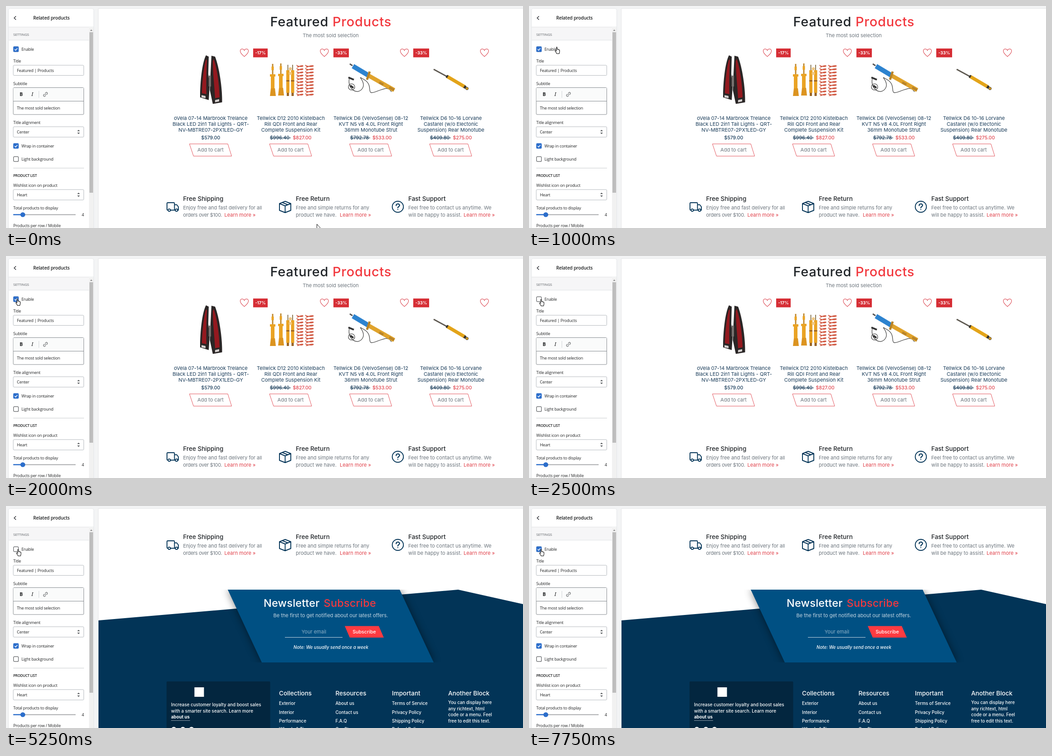
An HTML page for the animation above (8 s loop, 1140 by 491 pixels).

```html
<!DOCTYPE html>
<html lang="en">
<head>
<meta charset="utf-8">
<title>Related products settings</title>
<style>
html, body { margin: 0; width: 100%; height: 100%; overflow: hidden; background: #f3f4f5; }
svg { display: block; width: 1140px; height: 491px; }
text { white-space: pre; }
.side { font: 9.1px "Open Sans", "Noto Sans", sans-serif; letter-spacing: -.2px; fill: #202223; }
.side .caps { font-size: 8px; }
.semi { font-weight: 600; }
.field { fill: #fff; stroke: #b4b9be; }
.icon { fill: none; stroke: #5c5f62; }
.page { font: 11px Inter, "Open Sans", sans-serif; fill: #6c757d; }
.page .big { font-size: 29px; font-weight: 500; letter-spacing: .75px; }
.page .mid { font-size: 23.5px; font-weight: 500; letter-spacing: .2px; }
.page .head { font-size: 13.5px; font-weight: 500; fill: #212529; }
.page .price { font-size: 10.5px; font-weight: 500; }
.page .badge { font-size: 9.3px; font-weight: 700; fill: #fff; }
.page .small { font-size: 9.7px; font-weight: 500; fill: #fff; }
.c { text-anchor: middle; }
.old { text-decoration: line-through; }
.page .ink { fill: #212529; }
.page .navy { fill: #173a58; }
.page .red { fill: #e0414a; }
.page .hot { fill: #f2393f; }
.page .white { fill: #fff; }
.line { fill: none; stroke: #023457; stroke-width: 1.9; stroke-linejoin: round; stroke-linecap: round; }

#tick, #shop, #rest, #arrow, #beam, #hand { animation: 8s step-end infinite; }
#tick { animation-name: tick; }
#shop { animation-name: shop; }
#rest { animation-name: rest; }
#arrow { animation-name: arrow; }
#beam { animation-name: beam; }
#hand { animation-name: hand; }
@keyframes tick { 0%, 96.875%, 100% { opacity: 1; } 31.25% { opacity: 0; } }
@keyframes shop { 0% { opacity: 1; } 65.625%, 100% { opacity: 0; } }
@keyframes rest { 0% { transform: translateY(358px); } 65.625%, 100% { transform: none; } }
@keyframes arrow {
  0% { transform: translate(685px, 482px); opacity: 1; }
  3.125% { transform: translate(607px, 302px); opacity: 1; }
  6.25% { transform: translate(52px, 127px); opacity: 0; }
  9.375% { transform: translate(52px, 127px); opacity: 1; }
  12.5%, 100% { transform: translate(52px, 127px); opacity: 0; }
}
@keyframes beam { 0%, 9.375%, 100% { opacity: 0; } 6.25% { opacity: 1; } }
@keyframes hand {
  0% { transform: translate(57px, 90px); opacity: 0; }
  12.5% { transform: translate(57px, 90px); opacity: 1; }
  15.625% { transform: translate(24px, 91px); opacity: 1; }
  18.75% { transform: translate(14px, 91px); opacity: 1; }
  21.875% { transform: translate(27px, 93px); opacity: 1; }
  25% { transform: translate(21px, 94px); opacity: 1; }
  31.25%, 100% { transform: translate(22.5px, 95px); opacity: 1; }
}
</style>
</head>
<body>
<svg viewBox="0 0 1140 491">
  <defs>
    <g id="box"><rect x=".6" y=".6" width="10.8" height="10.8" rx="2" fill="#fff" stroke="#5c5f62" stroke-width="1.2"/></g>
    <g id="on"><rect width="12" height="12" rx="2" fill="#2c6ecb"/><path d="M3 6.2 5.2 8.4 9.2 4" fill="none" stroke="#fff" stroke-width="1.5"/></g>
    <g id="select"><rect class="field" x="16" y="-11.5" width="155.5" height="23" rx="2"/><path d="M157-1.5 160-4.8 163-1.5zM157 1.5 160 4.8 163 1.5z" fill="#5c5f62"/></g>
    <path id="heart" d="M0 8.8C-4 5.2-9 1.6-9-3.2-9-8.7-2.500-9.800 0-4.800 2.500-9.800 9-8.700 9-3.200 9 1.600 4 5.200 0 8.800z" fill="#fff" stroke="#dc4650" stroke-width="1.1"/>
    <g id="cart"><path d="M-46.500 305H38L46.500 332H-37.500z" fill="#fff" stroke="#e2525b"/><text class="c red" y="322">Add to cart</text></g>
    <pattern id="coil" width="16" height="7" patternUnits="userSpaceOnUse">
      <path d="M1 1.500C2 5.500 14 5.500 15 3.500M15 3.500C14 1 2 6 1 8.500M1-5.500M1 1.500" fill="none" stroke="#cf5139" stroke-width="1.700"/>
    </pattern>
    <path id="spring" d="M0 0H16V70H0z" fill="url(#coil)"/>
    <g id="strut" fill="#eaa324"><path d="M-1.500 0h3v24h-3z" fill="#c08a32"/><path d="M-2.500 6h5v8h-5zM-6 23H6v5H-6zM-4 28h8v28h-8z"/><path d="M-4 54H5l2 17H-6z" fill="#dc9420"/></g>
    <g id="damper" fill="#eaa324"><path d="M-1 0h2v14h-2z" fill="#8d7a55"/><path d="M-3.500 12h7v50h-7z"/><path d="M-2.500 62h5v7h-5zM-3.500 34h7v3h-7z" fill="#9a6526"/></g>
    <clipPath id="band"><path d="M204 185H1140V346H204z"/></clipPath>
    <clipPath id="view"><path d="M204 6H1140V491H204z"/></clipPath>
    <filter id="soft" x="-20%" y="-20%" width="140%" height="140%"><feGaussianBlur stdDeviation="9"/></filter>
  </defs>

  <rect width="1140" height="491" fill="#f3f4f5"/>
  <rect x="204" y="6" width="936" height="485" fill="#fff"/>
  <path d="M203.500 491V5.500H1140" fill="none" stroke="#e4e6e8"/>

  <g class="side">
    <path d="M5.500 491V9.500a4 4 0 0 1 4-4h180a4 4 0 0 1 4 4V491" fill="#fff" stroke="#e4e6e8"/>
    <path d="M22 22.500 18 26.500 22 30.500" fill="none" stroke="#303338" stroke-width="1.5"/>
    <text class="semi" x="60" y="30" style="font-size:10.2px">Related products</text>
    <path d="M6 47H183V76H6z" fill="#f6f6f7"/>
    <path d="M6 46.500H193M6 75.500H183" stroke="#e1e3e5"/>
    <text class="caps" x="16" y="66" style="fill:#5f6368">SETTINGS</text>
    <path d="M183 48H193V491H183z" fill="#f1f1f1"/>
    <path d="M184 58H192V413H184z" fill="#bdbdbd"/>
    <path d="M185.500 55 188 52 190.500 55z" fill="#858585"/>

    <use href="#box" x="16" y="89.500"/>
    <use id="tick" href="#on" x="16" y="89.500"/>
    <text x="34" y="99">Enable</text>
    <text x="16" y="125">Title</text>
    <rect class="field" x="16" y="131" width="155.500" height="22.500" rx="2"/>
    <text x="24" y="146">Featured | Products</text>
    <text x="16" y="174.500">Subtitle</text>
    <rect class="field" x="16" y="180.500" width="155.500" height="59.500" rx="2" style="stroke:#868b90"/>
    <path d="M16.500 181H171V210H16.500z" fill="#fafbfb"/>
    <path d="M16 210.500H171.500" stroke="#868b90"/>
    <path d="M72.500 188V203" stroke="#d2d5d8"/>
    <text x="30" y="199" style="font-size:10.5px;font-weight:700">B</text>
    <text x="56" y="199" style="font:italic 11px 'Noto Serif',serif">I</text>
    <g class="icon" transform="translate(87 195.500) rotate(-45)"><path d="M-1-2.200H-3.200a2.200 2.200 0 0 0 0 4.400H-1M1-2.200H3.200a2.200 2.200 0 0 1 0 4.400H1M-2.200 0H2.200"/></g>
    <text x="24" y="229">The most sold selection</text>
    <text x="16" y="261">Title alignment</text>
    <use href="#select" y="278.500"/>
    <text x="24" y="282">Center</text>
    <use href="#on" x="16" y="303.500"/>
    <text x="34" y="313">Wrap in container</text>
    <use href="#box" x="16" y="332.500"/>
    <text x="34" y="342">Light background</text>
    <path d="M16 358.500H172" stroke="#c9cccf"/>
    <text class="caps semi" x="16" y="377.500" style="letter-spacing:-.3px">PRODUCT LIST</text>
    <text x="16" y="400">Wishlist icon on product</text>
    <use href="#select" y="417.500"/>
    <text x="24" y="421">Heart</text>
    <text x="16" y="449.500">Total products to display</text>
    <path d="M38 461.500H154" stroke="#55585c" stroke-width="2" stroke-dasharray="1 1"/>
    <path d="M16 461.500H37" stroke="#2c6ecb" stroke-width="2.500"/>
    <circle cx="37" cy="461.500" r="5.300" fill="#2c6ecb"/>
    <text x="167" y="465">4</text>
    <text x="16" y="488.500">Products per row / Mobile</text>
  </g>

  <g class="page" clip-path="url(#view)">
    <g id="shop">
      <text class="big ink" x="582.500" y="45">Featured</text>
      <text class="big hot" x="720" y="45">Products</text>
      <text class="c" x="716" y="69">The most sold selection</text>

      <!-- tail lights -->
      <g fill="#2a2626">
        <path d="M441 109C433 124 428 165 428 202L447 208 449 178 446 150 447 112z"/>
        <path d="M453 110 461 112C470 135 477 180 476.500 213L456 216.500 449.500 186 451 150z"/>
        <path d="M447 154h5v24h-5z" fill="#77706e"/>
      </g>
      <g fill="#94191f">
        <path d="M441 118C436 135 433 165 432 193L442 195C441 170 442 140 443 120z"/>
        <path d="M458 117C465 137 470 170 471 202L461 204C460 180 456 150 456 122z"/>
      </g>
      <path d="M431 197 440 199V204L431 202zM461 208 470 206V211L461 213z" fill="#d5d0ce"/>

      <!-- suspension kit -->
      <use href="#strut" x="588" y="128"/><use href="#strut" x="606" y="127"/>
      <use href="#damper" x="621.500" y="130"/><use href="#damper" x="632" y="130"/>
      <circle cx="627" cy="139" r="3.500" fill="#f0c884"/><circle cx="627" cy="149" r="3.500" fill="#f0c884"/>
      <use href="#spring" x="640" y="129"/>
      <use href="#spring" transform="translate(659 129) scale(1.25 1)"/>

      <!-- strut with cables -->
      <g fill="none" stroke="#3b3b3b" stroke-width="1.200"><path d="M757 160C752 185 776 198 786 182S768 150 790 163 792 198 814 190 843 178 850 190"/><circle cx="762" cy="179" r="7"/></g>
      <path d="M758 128 764 132" stroke="#555" stroke-width="3"/>
      <path d="M765 133 800 154" stroke="#2d83cf" stroke-width="10.500"/>
      <path d="M798 153 856 186" stroke="#e0a32c" stroke-width="9"/>
      <path d="M802 145 796 163M823 169 832 174M845 180 856 186" stroke="#b98429" stroke-width="5"/>
      <path d="M755 158 767 163M759 176 766 181" stroke="#333" stroke-width="4"/>

      <!-- shock absorber -->
      <path d="M943 140 976 158" stroke="#5d5850" stroke-width="3"/>
      <path d="M973 156 1012 179" stroke="#e3a419" stroke-width="7.500"/>
      <path d="M971 155 974 156.800M1010 178 1014 180.500" stroke="#37332d" stroke-width="6.500"/>
      <circle cx="1016.500" cy="182.500" r="3" fill="#d99d20" stroke="#3a342b"/>

      <use href="#heart" x="525.500" y="103"/><use href="#heart" x="702" y="103"/>
      <use href="#heart" x="878.500" y="103"/><use href="#heart" x="1055" y="103"/>
      <path d="M545 94h32v19.500h-32zM722 94h34v19.500h-34zM898 94h35v19.500h-35z" fill="#d62e35"/>
      <g class="c"><text class="badge" x="561" y="107">-17%</text><text class="badge" x="739" y="107">-33%</text><text class="badge" x="915.500" y="107">-33%</text></g>

      <g class="c navy">
        <text x="451.500" y="251.500">oVela 07-14 Marbrook Trelance</text>
        <text x="451.500" y="264.500">Black LED 2in1 Tail Lights - QRT-</text>
        <text x="451.500" y="277.500">NV-MBTRE07-2PX1LED-GY</text>
        <text x="628" y="251.500">Tellwick D12 2010 Kistelbach</text>
        <text x="628" y="264.500">Rill QDI Front and Rear</text>
        <text x="628" y="277.500">Complete Suspension Kit</text>
        <text x="804.500" y="251.500">Tellwick D6 (VelvoSense) 08-12</text>
        <text x="804.500" y="264.500">KVT N5 v8 4.0L Front Right</text>
        <text x="804.500" y="277.500">36mm Monotube Strut</text>
        <text x="981" y="251.500">Tellwick D6 10-16 Lorvane</text>
        <text x="981" y="264.500">Castarel (w/o Electonic</text>
        <text x="981" y="277.500">Suspension) Rear Monotube</text>
        <text class="price" x="451.500" y="295">$579.00</text>
      </g>
      <text class="price navy old" x="582" y="295">$996.40&#160;</text><text class="price red" x="632.500" y="295">$827.00</text>
      <text class="price navy old" x="759" y="295">$792.78&#160;</text><text class="price red" x="808" y="295">$533.00</text>
      <text class="price navy old" x="935" y="295">$409.80&#160;</text><text class="price red" x="985.500" y="295">$275.00</text>
      <use href="#cart" x="451"/><use href="#cart" x="627.500"/><use href="#cart" x="804"/><use href="#cart" x="980.500"/>
    </g>

    <g id="rest">
      <g class="line">
        <path d="M357 93.500H356.500a1.500 1.500 0 0 1-1.500-1.500V78.500a1.500 1.500 0 0 1 1.500-1.500H370a1.500 1.500 0 0 1 1.500 1.500V93.500H363M371.500 81.500H376.500L380 86V93.500H379M373 93.500H371.500"/>
        <circle cx="360" cy="93.500" r="2.600"/><circle cx="376" cy="93.500" r="2.600"/>
        <path d="M615.500 74 628 79V94L615.500 99 603 94V79zM603 79 615.500 84 628 79M615.500 84V99M609 76.500 621.500 81.500"/>
        <circle cx="864" cy="86" r="12.300"/>
        <path d="M860.300 83.500C860.300 78.500 868 78.600 867.800 83 867.700 85.700 864 85.500 864 88.500M864 92V92.100" stroke-width="2.200"/>
      </g>
      <text class="head" x="390.500" y="72.500">Free Shipping</text>
      <text x="390.500" y="92">Enjoy free and fast delivery for all</text>
      <text x="390.500" y="108" style="letter-spacing:-.3px">orders over $100.</text>
      <text class="red" x="481.500" y="108">Learn more »</text>
      <text class="head" x="639" y="72.500">Free Return</text>
      <text x="639" y="92">Free and simple returns for any</text>
      <text x="639" y="108">product we have.</text>
      <text class="red" x="736" y="108">Learn more »</text>
      <text class="head" x="887" y="72.500">Fast Support</text>
      <text x="887" y="92">Feel free to contact us anytime. We</text>
      <text x="887" y="108">will be happy to assist.</text>
      <text class="red" x="1009" y="108">Learn more »</text>

      <path d="M204 253 997 185 1140 217V491H204z" fill="#023457"/>
      <g clip-path="url(#band)">
        <path d="M489 185H868L943 346H564z" fill="#000" opacity=".5" filter="url(#soft)"/>
        <path d="M489 185H868L943 346H564z" fill="#005083"/>
      </g>
      <text class="mid white" x="568" y="223">Newsletter</text>
      <text class="mid hot" x="700.500" y="223">Subscribe</text>
      <text class="c" x="716" y="246" style="fill:#c5d6e2">Be the first to get notified about our latest offers.</text>
      <text class="c" x="679" y="282" style="fill:#8fb0c7">Your email</text>
      <path d="M615 290.500H742" stroke="#c5d6e2"/>
      <path d="M747 265.500H822L833 291H758z" fill="#ff3b41"/>
      <text class="c white" x="790" y="282" style="font-weight:500;font-size:10.7px">Subscribe</text>
      <text class="c small" x="716.500" y="316" style="font-style:italic">Note: We usually send once a week</text>

      <rect x="354" y="388" width="228.500" height="110" rx="2" fill="#03263f"/>
      <rect x="415.500" y="401" width="21" height="21" fill="#fff"/>
      <text class="small" x="364" y="443" style="font-size:9.9px">Increase customer loyalty and boost sales</text>
      <text class="small" x="364" y="456.500" style="font-size:9.9px">with a smarter site search. Learn more</text>
      <text class="small" x="364" y="470" style="font-weight:700">about us</text>
      <path d="M364 474.500H406" stroke="#8b9ba8"/>
      <g fill="#fff"><circle cx="370" cy="494" r="5.500"/><circle cx="390" cy="494" r="5.500"/><circle cx="409" cy="494" r="5.500"/></g>

      <text class="head white" x="602" y="419">Collections</text>
      <text class="small" x="602" y="440">Exterior</text>
      <text class="small" x="602" y="459.500">Interior</text>
      <text class="small" x="602" y="478.500">Performance</text>
      <text class="small" x="602" y="497">Wheels &amp; Tires</text>
      <text class="head white" x="726.500" y="419">Resources</text>
      <text class="small" x="726.500" y="440">About us</text>
      <text class="small" x="726.500" y="459.500">Contact us</text>
      <text class="small" x="726.500" y="478.500">F.A.Q</text>
      <text class="small" x="726.500" y="497">Our Story</text>
      <text class="head white" x="851" y="419">Important</text>
      <text class="small" x="851" y="440">Terms of Service</text>
      <text class="small" x="851" y="459.500">Privacy Policy</text>
      <text class="small" x="851" y="478.500">Shipping Policy</text>
      <text class="small" x="851" y="497">Refund Policy</text>
      <text class="head white" x="975" y="419">Another Block</text>
      <text class="small" x="975" y="437.500">You can display here</text>
      <text class="small" x="975" y="451.500">any richtext, html</text>
      <text class="small" x="975" y="465">code or a menu. Feel</text>
      <text class="small" x="975" y="478.500">free to edit this text.</text>
    </g>
  </g>

  <!-- pointers -->
  <path id="arrow" d="M.5.5V16L4 12.800 6.400 18.300 8.600 17.300 6.200 12H11z" fill="#fff" stroke="#111"/>
  <path id="beam" d="M138 239.500H146M142 235V239" fill="none" stroke="#222"/>
  <path id="hand" d="M3.200 9.500V1.800c0-1.400 2-1.400 2 0V6.200c0-1.200 1.900-1.100 1.900.1v.5c.1-1.100 1.800-1 1.800.2v.6c.2-1 1.600-.8 1.600.4v3c0 2-1 2.400-1 4.500H4.200c0-1.500-2.400-3.600-3.400-5.600-.6-1.200.8-1.800 1.500-.9z" fill="#fff" stroke="#111" stroke-width="1.100"/>
</svg>
</body>
</html>
```
